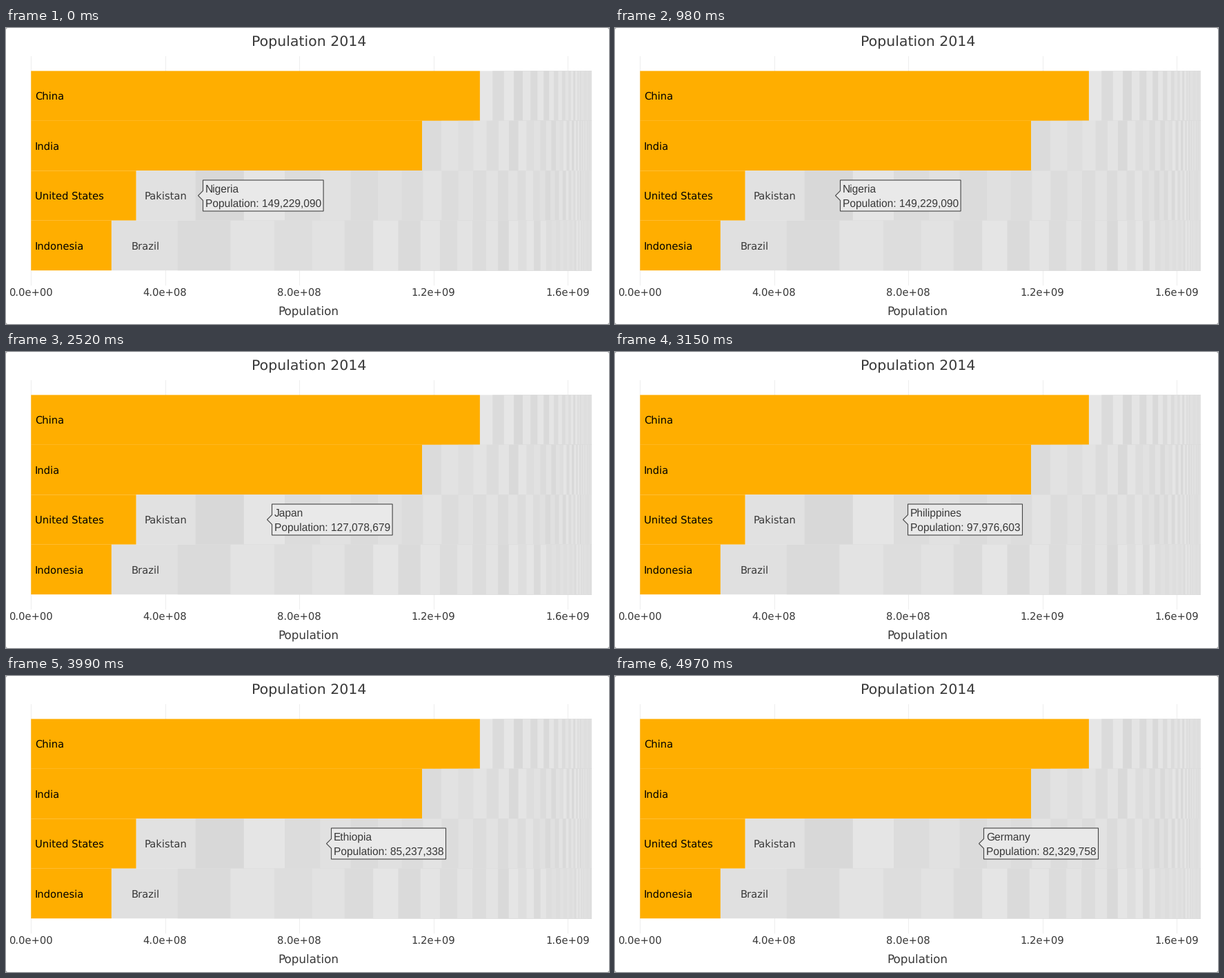
These frames come from a looping animation (874x430 px, 5040 ms). A matplotlib script:

```python
import numpy as np
import matplotlib.pyplot as plt
from matplotlib.animation import FuncAnimation
from matplotlib.patches import Polygon, Rectangle

W, H, DPI = 874, 430, 100
FRAMES, INTERVAL = 72, 70
LEFT, RIGHT, TOP, BOTTOM = 36.3, 848.5, 62.4, 352.2
PX_PER_TICK = 194.5  # one tick is 4e8 people
ORANGE, INK, LINE = "#ffae00", "#383838", "#444444"

plt.rcParams["text.hinting"] = "none"
fig = plt.figure(figsize=(W / DPI, H / DPI), dpi=DPI, facecolor="white")
ax = fig.add_axes([0, 0, 1, 1])
ax.set_xlim(0, W)
ax.set_ylim(H, 0)
ax.axis("off")


def text(x, y, s, px, color=INK, ha="left", font="DejaVu Sans", z=4):
    return ax.text(x, y, s, fontsize=px * 72 / DPI, color=color, ha=ha,
                   va="baseline", family=font, zorder=z)


def bar(x0, x1, y0, y1, color):
    ax.add_patch(Rectangle((x0, y0), x1 - x0, y1 - y0, facecolor=color,
                           linewidth=0, snap=False, zorder=2))


def split(start, rate):
    """Cut the row so that each bar takes a near constant share of the rest."""
    edges = [start]
    while (rest := RIGHT - edges[-1]) > 1:
        share = rate + 0.022 * (rest / 680) ** 4
        edges.append(edges[-1] + max(1, share * rest))
    return edges


def draw_row(y0, y1, edges, dark_first):
    """Alternate light and dark grey bars after the orange one."""
    for i, x in enumerate(edges):
        base = 219 if i % 2 == dark_first - 1 or i % 2 != dark_first else 227
        base = 219 if (i + dark_first) % 2 else 227
        level = (base + rng.uniform(-3, 3)) / 255
        bar(x, RIGHT, y0, y1, (level,) * 3)  # overlap hides seams
    bar(LEFT, edges[0], y0, y1, ORANGE)


# Grid and axis
for i in range(5):
    x = 36 + PX_PER_TICK * i
    ax.plot([x, x], [41, 373], color="#eeeeee", lw=0.8, zorder=1)
    text(x, 388.7, f"{4e8 * i:.1e}", 14.7, ha="center")
text(438.7, 417.4, "Population", 16.8, ha="center")
text(439, 25.8, "Population 2014", 20.5, ha="center")

# Rows: label, population, share per bar, dark bar first
ROWS = [("China", 1.3386e9, 0.114, False), ("India", 1.1661e9, 0.113, True),
        ("United States", 3.138e8, 0.111, False),
        ("Indonesia", 2.403e8, 0.114, False)]
rng = np.random.default_rng(4)
tops = np.linspace(TOP, BOTTOM, len(ROWS) + 1)
row_edges = []
for top, bottom, (name, people, rate, dark_first) in zip(tops, tops[1:], ROWS):
    edges = split(36 + people / 4e8 * PX_PER_TICK, rate)
    draw_row(top, bottom, edges, dark_first)
    text(41.8, top + 41.6, name, 14.7, color="black")
    row_edges.append(edges)
text(200.5, tops[2] + 41.6, "Pakistan", 14.7)
text(181.2, tops[3] + 41.6, "Brazil", 14.7)

# Rounded window corners
for cx, dx in ((0, 1), (W, -1)):
    for cy, dy in ((0, 1), (H, -1)):
        ax.add_patch(Polygon([(cx, cy), (cx + 2 * dx, cy), (cx, cy + 2 * dy)],
                             facecolor="#b0b0b0", linewidth=0, zorder=2))

# Hover label; the countries follow the bars of the third row
COUNTRIES = [("Pakistan", 176242949), ("Nigeria", 149229090),
             ("Japan", 127078679), ("Philippines", 97976603),
             ("Ethiopia", 85237338), ("Germany", 82329758)]
PATH_FRAMES = [0, 14, 24, 36, 45, 57, 71]
PATH_X = [278, 319, 343, 378, 417, 464, 527]

hover = Polygon([(0, 0), (1, 0), (1, 1)], closed=True, facecolor="#e9e9e9",
                edgecolor=LINE, linewidth=0.8, joinstyle="miter", zorder=5)
ax.add_patch(hover)
hover_name = text(0, 238.8, "", 15.5, font="Liberation Sans", z=6)
hover_value = text(0, 259.2, "", 15.5, font="Liberation Sans", z=6)


def update(frame):
    tip = round(float(np.interp(frame, PATH_FRAMES, PATH_X))) + 0.5
    name, people = COUNTRIES[np.searchsorted(row_edges[2], tip) - 1]
    value = f"{people:,}"
    left, mid, half = tip + 7, 243.5, 22.5
    right = left + 80 + 8.6 * len(value)
    hover.set_xy([(tip, mid), (left, mid + 7), (left, mid + half),
                  (right, mid + half), (right, mid - half),
                  (left, mid - half), (left, mid - 7)])
    hover_name.set_text(name)
    hover_value.set_text("Population: " + value)
    for label in (hover_name, hover_value):
        label.set_x(left + 3.3)
    return hover, hover_name, hover_value


anim = FuncAnimation(fig, update, frames=FRAMES, interval=INTERVAL,
                     repeat=True, repeat_delay=0, blit=False)
plt.show()
```
